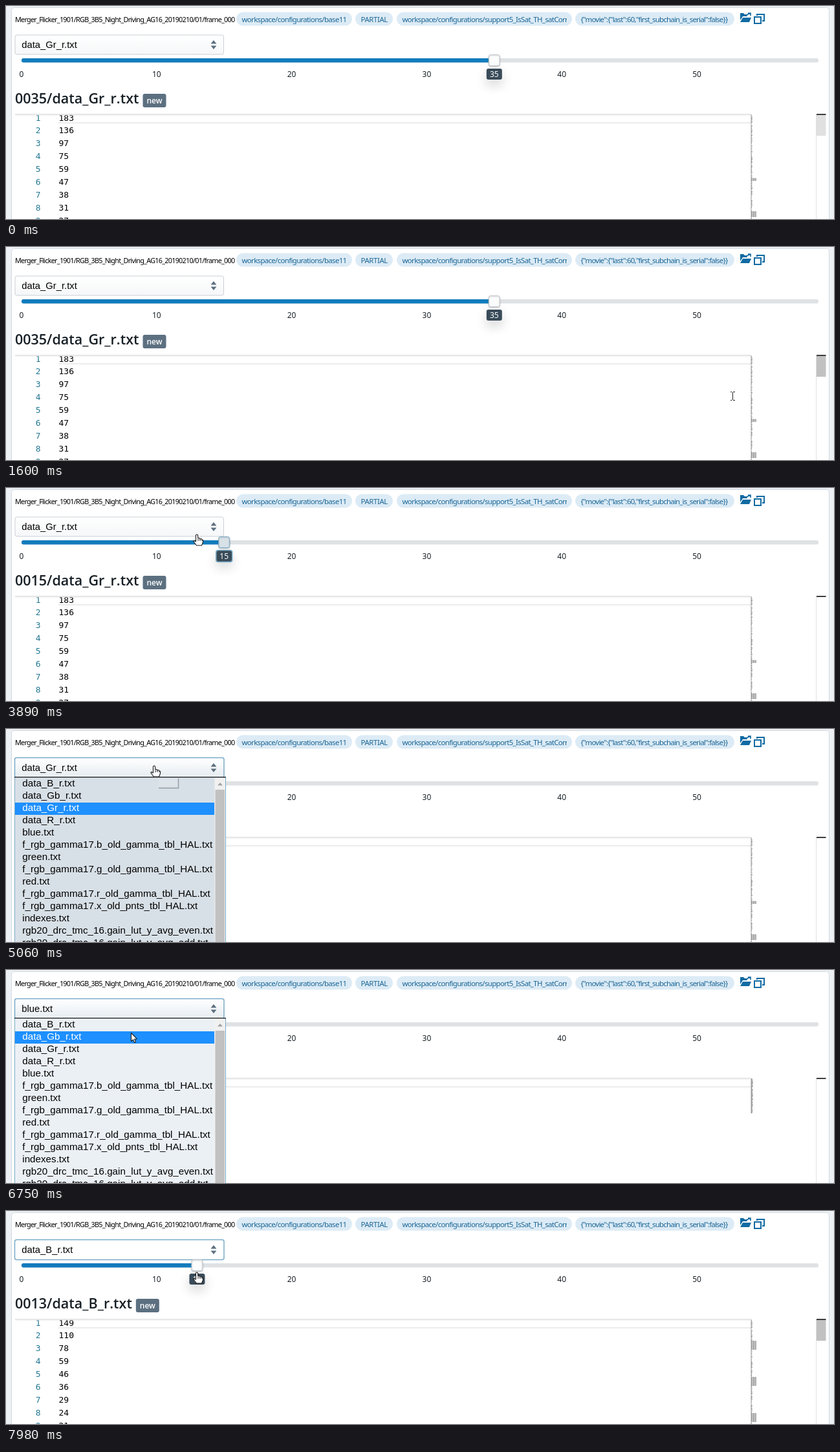
These frames come from a looping animation (1280x330 px, 8000 ms). An HTML page with a canvas:

```html
<!DOCTYPE html>
<html lang="en">
<head>
<meta charset="utf-8">
<title>Data viewer</title>
<style>
  html, body { margin: 0; width: 100%; height: 100%; overflow: hidden; }
  canvas { display: block; }
</style>
</head>
<body>
<canvas id="stage" width="1280" height="330"></canvas>
<script>
const ctx = document.getElementById('stage').getContext('2d');
const LOOP = 8000;
const UI = '"Noto Sans", "Open Sans", sans-serif';
const TITLE = '600 21.5px "Open Sans", "Noto Sans", sans-serif';
const ARIAL = '"Liberation Sans", Arial, sans-serif';
const MONO = '13px "DejaVu Sans Mono", monospace';
const BLUE = '#106ba3', SLATE = '#5c7080', FOCUS = '#7aabc8';

const gamma = c => `f_rgb_gamma17.${c}_old_gamma_tbl_HAL.txt`;
const lut = s => `rgb20_drc_tmc_16.gain_lut_y_avg_${s}.txt`;
const FILES = [...['B', 'Gb', 'Gr', 'R'].map(c => `data_${c}_r.txt`), 'blue.txt', gamma('b'), 'green.txt',
  gamma('g'), 'red.txt', gamma('r'), 'f_rgb_gamma17.x_old_pnts_tbl_HAL.txt', 'indexes.txt', lut('even'), lut('odd')];

// block(k): height of the k-th dense stretch in the minimap
const GR = { lines: '183 136 97 75 59 47 38 31 27'.split(' '), end: 330, block: k => 4.5 * k };
const RAMP = { lines: Array.from({ length: 9 }, (_, i) => i * 16), end: 222, block: () => 0 };
const B = { lines: '149 110 78 59 46 36 29 24 21'.split(' '), end: 330, block: () => 14 };

const ROW = 19, LIST_TOP = 76, LAG = 70;
const sliderX = v => 24 + v * 20.88;
const rowY = i => LIST_TOP + ROW * (i + 0.65);
const clamp01 = v => Math.max(0, Math.min(1, v));
const ramp = (t, a, b) => clamp01((t - a) / (b - a));

// pointer glides: start, end, target x, target y
const GLIDES = [
  [70, 820, 1172, 90],
  [900, 1160, 1124, 231],
  [1600, 2190, sliderX(35), 80],
  [2330, 3090, sliderX(31), 72],
  [3180, 3890, sliderX(13), 72],
  [4180, 4740, 229, 57],
  [5100, 5570, 180, rowY(4)],
  [5800, 6590, 198, 60],
  [6670, 6900, 185, rowY(4)],
  [7050, 7210, 185, rowY(0)],
  [7430, 7980, sliderX(13), 95]
];

function pointerAt(t) {
  let x = 1245, y = 305;
  for (const [start, end, tx, ty] of GLIDES) {
    const k = ramp(t, start, end);
    x += (tx - x) * k;
    y += (ty - y) * k;
  }
  return [x, y];
}

// the knob trails the dragging pointer a little
function sliderValue(t) {
  if (t < 2330 + LAG) return 35;
  return Math.round((pointerAt(Math.min(t - LAG, 3890))[0] - 24) / 20.88);
}

function rect(x, y, w, h, fill) {
  ctx.fillStyle = fill;
  ctx.fillRect(x, y, w, h);
}

function paint(path, fill, stroke, width = 1) {
  if (fill) { ctx.fillStyle = fill; ctx.fill(path); }
  if (stroke) { ctx.strokeStyle = stroke; ctx.lineWidth = width; ctx.stroke(path); }
}

function box(x, y, w, h, r, fill, stroke, width) {
  const path = new Path2D();
  path.roundRect(x, y, w, h, r);
  paint(path, fill, stroke, width);
}

function triangle(x, y, half, height, fill) {
  paint(new Path2D(`M${x - half} ${y}h${2 * half}l${-half} ${height}z`), fill);
}

function text(s, x, y, font, color, align = 'left', spacing = 0) {
  ctx.font = font;
  ctx.fillStyle = color;
  ctx.textAlign = align;
  ctx.letterSpacing = spacing + 'px';
  ctx.fillText(s, x, y);
  const width = ctx.measureText(s).width;
  ctx.letterSpacing = '0px';
  return width;
}

function scoped(draw) {
  ctx.save();
  draw();
  ctx.restore();
}

function withShadow(color, blur, dy, draw) {
  scoped(() => {
    ctx.shadowColor = color;
    ctx.shadowBlur = blur;
    ctx.shadowOffsetY = dy;
    draw();
  });
}

function clipTo(x, y, w, h, draw) {
  scoped(() => {
    ctx.beginPath();
    ctx.rect(x, y, w, h);
    ctx.clip();
    draw();
  });
}

function vertical(y0, y1, from, to) {
  const g = ctx.createLinearGradient(0, y0, 0, y1);
  g.addColorStop(0, from);
  g.addColorStop(1, to);
  return g;
}

function pill(x, w, label, spacing = -0.64) {
  box(x, 9.5, w, 21, 10.5, '#dcebf5');
  clipTo(x, 9, w - 8, 22, () => text(label, x + 8.5, 25, '11.4px ' + UI, '#1a6596', 'left', spacing));
}

function header() {
  rect(0, 0, 1280, 330, '#edf1f5');
  box(8.5, 2.5, 1264, 340, 4, '#fff', '#d3d9df');
  text('Merger_Flicker_1901/RGB_3B5_Night_Driving_AG16_20190210/01/frame_000', 14, 25, '10.8px ' + UI, '#000', 'left', -0.72);
  pill(356, 179, 'workspace/configurations/base11');
  pill(540, 58, 'PARTIAL', -0.4);
  pill(604, 271, 'workspace/configurations/support5_IsSat_TH_satCorr');
  pill(880, 246, '{"movie":{"last":60,"first_subchain_is_serial":false}}', -0.77);
  paint(new Path2D('M1135 11h5l2 2h3v3h-6l-4 6zM1139 18h13l-3 7h-14z'), BLUE);
  paint(new Path2D('M1144 16q2 -4 6 -4M1147 11h4v4'), null, BLUE, 1.7);
  paint(new Path2D('M1157 17h10v10h-10zM1161 15v-2h11v10h-3'), null, BLUE, 2);
}

function slider(value, active) {
  const x = sliderX(value);
  box(24, 81, 1232, 6.6, 3, '#dfe2e5');
  box(24, 81, x - 24, 6.6, 3, '#137cbd');
  for (let v = 0; v <= 50; v += 10) text(v, sliderX(v), 110, '12px ' + UI, '#182026', 'center');
  withShadow('rgba(16,22,26,.2)', 18, 8, () => box(x - 12, 97, 24, 17, 3, '#394b59'));
  if (active) box(x - 12.5, 96.5, 25, 18, 3, null, FOCUS, 1.5);
  text(value, x, 110, '12px ' + UI, '#fff', 'center');
  withShadow('rgba(16,22,26,.25)', 2, 1, () =>
    box(x - 8.5, 75.5, 17, 17, 3, active ? '#d8e1e8' : '#fbfcfc', active ? FOCUS : '#c5cbd0'));
}

function select(file, hover, focus) {
  const shade = vertical(45, 75, '#fff', hover ? '#e6ecf0' : focus ? '#fff' : '#f5f7f8');
  const grow = focus ? 0.5 : 0;
  box(14 - grow, 45 - grow, 322.5 + 2 * grow, 30 + 2 * grow, 3, shade, focus ? FOCUS : '#c9cfd5', focus ? 1.5 : 1);
  text(file, 24.3, 65, '14.8px ' + ARIAL, '#000');
  triangle(321, 58.5, 4.5, -5.5, SLATE);
  triangle(321, 61.5, 4.5, 5.5, SLATE);
}

function heading(label) {
  const x = 14 + text(label, 14, 151, TITLE, '#182026') + 6;
  box(x, 136, 36, 21, 3, SLATE);
  text('new', x + 18, 151, '600 12px "Open Sans", sans-serif', '#fff', 'center');
}

function minimap({ end, block }) {
  let seed = 7;
  for (let y = 168; y < end; y++) {
    seed = (seed * 73 + 41) % 997;
    rect(1151.5, y, (end < 300 ? 2 : 1) + seed % 3 * 0.6, 1, y % 2 ? '#8c8c8c' : '#adadad');
  }
  for (let k = 0; k < 3; k++) {
    const h = block(k);
    for (let col = 0; col < 3; col++) rect(1152 + col * 2.8, 215 + 56 * k - h, 2.2, h, '#a2a2a2');
  }
}

function editor(content, thumb) {
  clipTo(14, 167, 1256, 163, () => {
    content.lines.forEach((n, i) => {
      const y = 177.5 + i * 19.9;
      text(i + 1, 53.5, y, MONO, '#237893', 'right');
      text(n, 81.5, y, MONO, '#000');
    });
    rect(14, 160, 1138, 8, '#fff');
    rect(81, 180, 1071, 2, '#ececec');
    minimap(content);
    rect(1252, 168, 1, 162, '#e0e0e0');
    rect(1253, 169, 14.5, 32, `rgba(100,100,100,${0.4 * thumb})`);
    rect(14, 167, 1138, 4, vertical(167, 171, 'rgba(215,215,215,.9)', 'rgba(230,230,230,0)'));
    rect(1253, 167, 14.5, 2, '#3c3c3c');
  });
}

function dropdown(row, hover, hint) {
  rect(13, 75, 327, 255, hover ? '#d8e0e7' : '#ebf0f5');
  if (hint) {
    rect(236, 76, 30, 15, '#dce3e9');
    paint(new Path2D('M236 91.5h30.5v-15'), null, '#949ca3', 1.4);
  }
  rect(14, LIST_TOP + row * ROW, 308, ROW, '#1e90ff');
  FILES.forEach((name, i) =>
    text(name, 25.3, LIST_TOP + 13 + i * ROW, '15.2px ' + ARIAL, i === row ? '#fff' : '#000'));
  rect(322.5, 76, 16.5, 254, '#f1f1f1');
  rect(323.5, 94, 14.5, 236, '#c1c1c1');
  triangle(331, 87.5, 4, -4.5, '#a3a3a3');
  for (const x of [13, 339]) rect(x, 75, 1, 255, FOCUS);
  rect(13, 74, 327, 1.2, '#101010');
}

const HAND = new Path2D('M-1.5 1q1.5 -2 3 0l.3 5 2.2 -.5 1 1.5 2 -.5 1 1.5 1.5 .5v3.5l-2 5h-8l-4.5 -6 .5 -1.5 3 1.5z');
const FINGERS = new Path2D('M2 7v3M5 7v3M8 8v2');
const ARROW = new Path2D('M.5 .5v13l2.9 -2.7 2 4.7 2.2 -1 -2 -4.5 3.9 -.2z');
const IBEAM = new Path2D('M-3 -6.5h2M1 -6.5h3M-3 6.5h2M1 6.5h3M.5 -6v12');

function pointer(kind, x, y) {
  scoped(() => {
    ctx.translate(Math.round(x), Math.round(y));
    ctx.lineJoin = 'round';
    if (kind === 'text') paint(IBEAM, null, '#222');
    else paint(kind === 'hand' ? HAND : ARROW, '#fff', '#1a1a1a', 1.1);
    if (kind === 'hand') paint(FINGERS, null, '#1a1a1a');
  });
}

function draw(t) {
  const value = sliderValue(t);
  const dragging = t >= 2330 && t < 4030;
  const open = (t >= 4890 && t < 5800) || (t >= 6670 && t < 7430);
  const chosen = t < 5800 ? 2 : t < 7430 ? 4 : 0;
  const content = t < 5900 ? GR : t < 7500 ? RAMP : B;
  const thumb = t < 5000 ? (0.5 + ramp(t, 0, 140) / 2) * (1 - ramp(t, 2100, 2900)) : ramp(t, 7500, 7600);
  const [px, py] = pointerAt(t);
  const onSelect = !dragging && px > 14 && px < 337 && py > 45 && py < 75;
  const onKnob = Math.abs(px - sliderX(value)) < 10 && py > 75 && py < 97;
  const onText = py > 168 && px > 80 && px < 1151;

  header();
  heading(String(value).padStart(4, '0') + '/' + FILES[chosen]);
  editor(content, thumb);
  select(FILES[chosen], onSelect || open, t >= 4890);
  slider(value, dragging);
  if (open) {
    const row = py > LIST_TOP ? Math.floor((py - LIST_TOP) / ROW) : chosen;
    dropdown(row, onSelect, t < 5300);
  }
  if (t >= 70) {
    const hand = dragging || onSelect || (onKnob && !open);
    pointer(hand ? 'hand' : onText && !open ? 'text' : 'arrow', px, py);
  }
}

function tick(now) {
  draw(now % LOOP);
  requestAnimationFrame(tick);
}
requestAnimationFrame(tick);
</script>
</body>
</html>
```
